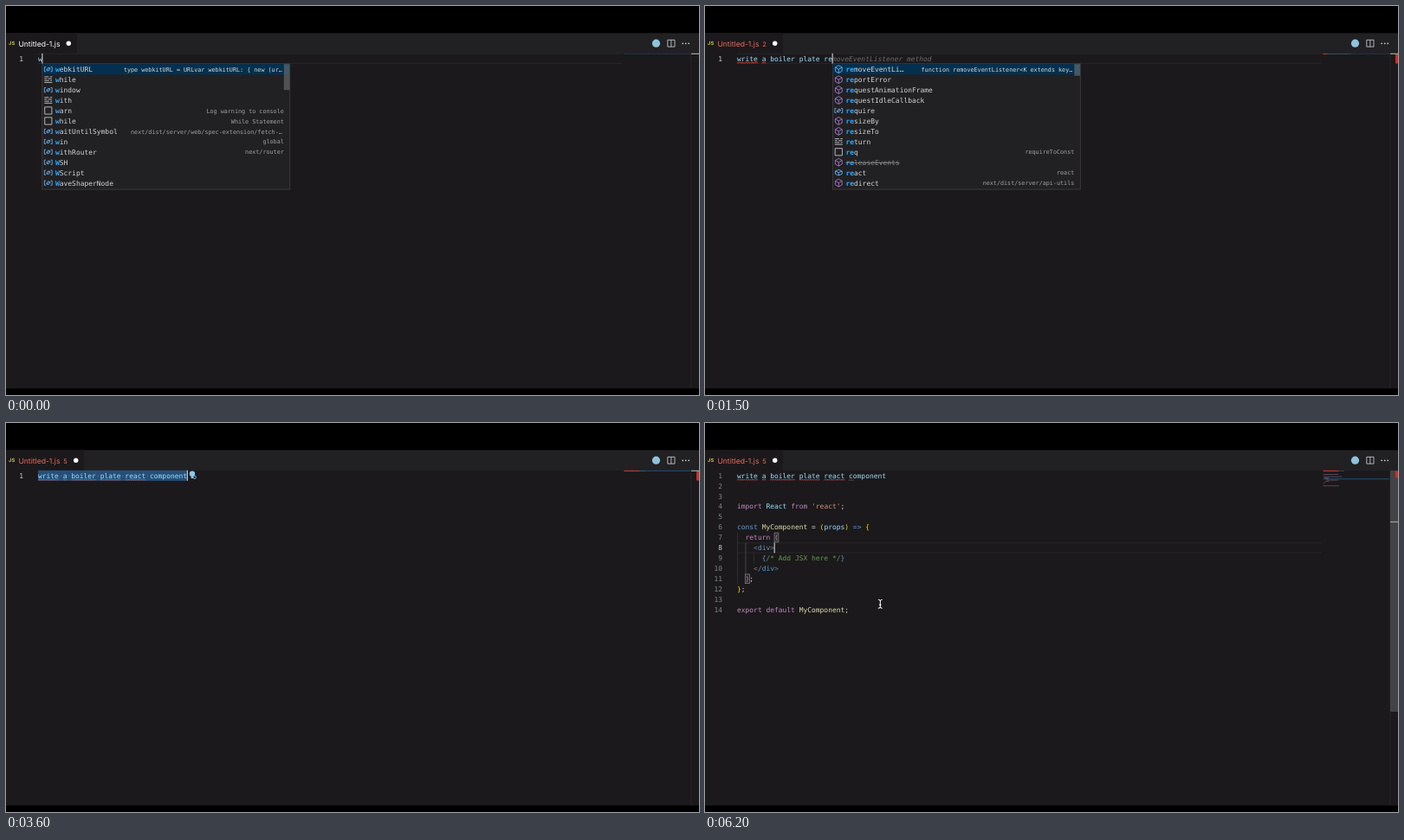
An HTML page that plays this animation: 800 px wide and 450 px high, repeating every 6.3 s.

```html
<!DOCTYPE html>
<html lang="en">
<head>
<meta charset="utf-8">
<title>Editor typing loop</title>
<style>
  html, body { margin: 0; width: 100%; height: 100%; overflow: hidden; background: #000; }
  svg { display: block; width: 800px; height: 450px; }
  text { font: 7.946px "DejaVu Sans Mono", monospace; white-space: pre; text-rendering: geometricPrecision; fill: #d4d4d4; }
  .ui { font: 8.6px Inter, sans-serif; fill: #fff; }
  .count { font-size: 7.6px; }
  .bad { fill: #e8695e; }
  .js { font: 700 5.8px Inter, sans-serif; fill: #cbcb41; }
  .num { fill: #858585; text-anchor: end; }
  .on { fill: #d0d0d0; }
  .detail { font-size: 6.76px; text-anchor: end; fill: #a2a2a2; }
  .picked .detail { fill: #d8d8d8; }
  .hit { fill: #2aaaff; font-weight: 700; }
  .old { text-decoration: line-through; fill: #8a8a8a; }
  .ghost { fill: #6c6b6d; font-style: italic; }
  .dots { fill: #5f8199; }
  .k { fill: #c586c0; } .v { fill: #9cdcfe; } .f { fill: #dcdcaa; }
  .b { fill: #569cd6; } .s { fill: #ce9178; } .c { fill: #6a9955; }
  .g { fill: #808080; } .y { fill: #ffd700; } .p { fill: #da70d6; } .w { fill: #d4d4d4; }
</style>
</head>
<body>
<svg viewBox="0 0 800 450">
  <rect width="800" height="450" fill="#000"/>
  <rect y="31.5" width="800" height="411" fill="#1b191b"/>
  <rect y="31.5" width="800" height="23.5" fill="#212023"/>
  <g id="scene"></g>
  <circle cx="750.5" cy="43.2" r="4.6" fill="#8fc3dc"/>
  <path d="M763.8 39.3h8.2v7.8h-8.2zM767.9 39.3v7.8" fill="none" stroke="#c5c5c5" stroke-width=".9"/>
  <g fill="#c5c5c5"><circle cx="781.2" cy="43.3" r=".9"/><circle cx="784.7" cy="43.3" r=".9"/><circle cx="788.2" cy="43.3" r=".9"/></g>
</svg>
<script>
const LOOP = 6300, TICK = 100;
const CH = 4.784, LH = 11.95, LEFT = 37, TOP = 54.8;
const PROMPT = 'write a boiler plate react component ';
const INSERT_AT = 4900, CLICK_AT = 5600, SELECT_AT = 3400;

const CODE = [
  ['v', PROMPT.trim()], [], [],
  ['k', 'import ', 'v', 'React', 'k', ' from ', 's', "'react'", 'w', ';'],
  [],
  ['b', 'const ', 'f', 'MyComponent', 'w', ' = ', 'y', '(', 'v', 'props', 'y', ')', 'b', ' => ', 'y', '{'],
  ['k', '  return ', 'p', '('],
  ['g', '    <', 'b', 'div', 'g', '>'],
  ['b', '      {', 'c', '/* Add JSX here */', 'b', '}'],
  ['g', '    </', 'b', 'div', 'g', '>'],
  ['p', '  )', 'w', ';'],
  ['y', '}', 'w', ';'],
  [],
  ['k', 'export default ', 'f', 'MyComponent', 'w', ';']
];

// icon|label|detail
const W_LIST = `var|webkitURL|type webkitURL = URLvar webkitURL: { new (ur…
key|while
var|window
key|with
snip|warn|Log warning to console
snip|while|While Statement
var|waitUntilSymbol|next/dist/server/web/spec-extension/fetch-…
var|win|global
var|withRouter|next/router
var|WSH
var|WScript
var|WaveShaperNode`.split('\n');
const RE_LIST = `fn|removeEventLi…|function removeEventListener<K extends key…
fn|reportError
fn|requestAnimationFrame
fn|requestIdleCallback
var|require
fn|resizeBy
fn|resizeTo
key|return
snip|req|requireToConst
fn|releaseEvents
mod|react|react
fn|redirect|next/dist/server/api-utils`.split('\n');

// Value of the last [time, value] pair reached
const step = (t, pairs) => pairs.filter(p => p[0] <= t).pop()[1];

function lerpKeys(t, keys) {
  for (let i = 1; i < keys.length; i++) {
    const [t0, a] = keys[i - 1], [t1, b] = keys[i];
    if (t <= t1) return a + (b - a) * (t - t0) / (t1 - t0);
  }
  return keys[keys.length - 1][1];
}

const esc = s => s.replace(/&/g, '&amp;').replace(/</g, '&lt;').replace(/>/g, '&gt;');
const rect = (x, y, w, h, fill, more = '') => `<rect x="${x}" y="${y}" width="${w}" height="${h}" fill="${fill}" ${more}/>`;
const path = (d, stroke, w = .8) => `<path d="${d}" fill="none" stroke="${stroke}" stroke-width="${w}"/>`;
const span = (cls, s) => `<tspan class="${cls}">${esc(s)}</tspan>`;
const text = (x, y, body, cls = '') => `<text x="${x}" y="${y}" class="${cls}" xml:space="preserve">${body}</text>`;
const lineTop = i => TOP + i * LH;
const baseline = i => lineTop(i) + 8.8;
const colX = c => LEFT + c * CH;
const plain = toks => toks.filter((_, i) => i % 2).join('');
const paint = toks => toks.map((s, i) => i % 2 ? span(toks[i - 1], s) : '').join('');

function tab(errors) {
  const w = errors ? (errors > 1 ? 90 : 89) : 82;
  return rect(0, 31.5, w, 23.5, '#1b191b')
    + text(3, 45.4, 'JS', 'js')
    + text(14.4, 46.6, 'Untitled-1.js', errors ? 'ui bad' : 'ui')
    + (errors ? text(66.2, 46.6, errors, 'ui count bad') : '')
    + `<circle cx="${errors ? w - 9.3 : 72.3}" cy="43.3" r="2.7" fill="#fff"/>`;
}

function squiggle(x, w) {
  let d = `M${x} 66.3`;
  for (let i = 0; i < Math.round(w / 1.2); i++) d += `l1.2 ${i % 2 ? 1.3 : -1.3}`;
  return path(d, '#e5483f', .8);
}

function underlines(count) {
  let col = 0, out = '';
  for (const word of PROMPT.split(' ').slice(0, count)) {
    out += squiggle(colX(col), word.length * CH);
    col += word.length + 1;
  }
  return out;
}

function icon(kind, x, y) {
  if (kind === 'var') return path(`M${x - 2.8} ${y - 2.6}h-1.6v5.2h1.6M${x + 2.8} ${y - 2.6}h1.6v5.2h-1.6M${x - 1.9} ${y}l2 -1.8l1.9 .9v1.2l-2 1.7l-1.9 -.9zM${x - 1.8} ${y + 1.8}l3.6 -3.6`, '#75beff', .8);
  if (kind === 'key') return path(`M${x - 4.5} ${y - 3.3}h5M${x + 2} ${y - 3.3}h2.5M${x - 4.5} ${y - 1.1}h3M${x - .3} ${y - 1.1}h4.5M${x - 4.5} ${y + 1.1}h5.5M${x + 2.3} ${y + 1.1}h2M${x - 4.5} ${y + 3.3}h9`, '#c5c5c5', .9);
  if (kind === 'snip') return path(`M${x - 4.1} ${y - 4.1}h8.2v8.2h-8.2z`, '#c5c5c5', .9);
  const flat = kind === 'mod' ? .75 : 1;
  const [a, b] = [2.2 * flat, 4.4 * flat];
  return path(`M${x} ${y - b}l3.9 ${a}v${b}l-3.9 ${a}l-3.9 ${-a}v${-b}zM${x - 3.9} ${y - a}l3.9 ${a}l3.9 ${-a}M${x} ${y}v${b}`,
    kind === 'fn' ? '#b180d7' : '#75beff', .8);
}

// Indices of the typed letters inside the label, or null
function match(label, word) {
  const hits = [];
  let from = 0;
  for (const c of word) {
    const at = label.toLowerCase().indexOf(c, from);
    if (at < 0) return null;
    hits.push(at);
    from = at + 1;
  }
  return hits;
}

function popup(list, word, x, thumb) {
  const rows = list.map(r => r.split('|')).filter(r => match(r[1], word));
  if (!rows.length) return '';
  const y = 67.2, h = rows.length * 11.95;
  let out = rect(x, y - .3, 286, h + 1.8, '#212023', 'stroke="#454446" stroke-width=".7"');
  rows.forEach(([kind, label, detail = ''], i) => {
    const top = y + i * 11.95, mid = top + 6;
    const hits = match(label, word);
    const name = [...label].map((c, j) => hits.includes(j) ? span('hit', c) : esc(c)).join('');
    const end = x + 279 - (detail.endsWith('…') ? 2 : 0);
    out += `<g class="${i ? '' : 'picked'}">`
      + (i ? '' : rect(x + .4, top, 285.2, 12, '#04304f'))
      + icon(!i && kind === 'fn' ? 'mod2' : kind, x + 7, mid)
      + text(x + 15.2, top + 8.9, name, label === 'releaseEvents' ? 'old' : '')
      + (detail ? text(end, top + 8.6, esc(detail), 'detail') : '') + '</g>';
  });
  if (rows.length === list.length) out += rect(x + 279, y, 6.7, thumb, '#79797a', 'opacity=".55"');
  return out;
}

function bulb(x, y) {
  return `<circle cx="${x}" cy="${y - 1.3}" r="3.2" fill="#8cc8f0"/>`
    + rect(x - 1.4, y + 1.4, 2.8, 2.6, '#8cc8f0')
    + `<circle cx="${x + 2.7}" cy="${y + 2.7}" r="1.7" fill="#1b191b" stroke="#8cc8f0" stroke-width=".9"/>`;
}

function selection(lines) {
  return lines.map((l, i) => {
    const tail = i < lines.length - 1 ? 1 : 0;
    return rect(LEFT, lineTop(i), (l.length + tail) * CH, LH + .1, '#264f78');
  }).join('');
}

const caret = (line, col) => rect(colX(col) - .4, lineTop(line), 1, LH, '#e4e4e4');
const lineFrame = line => path(`M${LEFT} ${lineTop(line) + .4}H711M${LEFT} ${lineTop(line) + LH - .4}H711`, '#2b292c', .8);

function minimap(lines, errors, activeLine, selected) {
  const x = 713.5, unit = .68, row = 1.33;
  const at = i => 55 + i * row;
  let out = selected && lines.length > 1
    ? rect(x, 54.8, 77, 18.6, '#1d3a57')
    : rect(x, at(activeLine) - .2, 77, 1.2, selected || activeLine ? '#1f4766' : '#1c3440');
  lines.forEach((l, i) => {
    const pad = l.length - l.trimStart().length;
    if (l) out += rect(x + pad * unit, at(i), (l.length - pad) * unit, .9, i ? '#8a6a86' : '#3f6a70', 'opacity=".6"');
  });
  const bad = PROMPT.split(' ').slice(0, errors).join(' ').length;
  return out + (bad ? rect(x, at(0) - .1, bad * unit, 1.2, '#b8352f') : '');
}

function ruler(errors, full, y) {
  return rect(790.5, 55, .8, 387, '#2a282b')
    + (full ? rect(791, 55, 9, 279, '#434244') : '')
    + (errors ? rect(797, 55.5, 3, full ? 8 : 11, '#c9302a') : '')
    + rect(791, y - .7, 9, 1.3, '#9a999b');
}

function ghostFor(n) {
  if (n >= 15 && n < 20) return 'plate'.slice(n - 15);
  return { 23: 'moveEventListener method', 27: 'component', 37: 'with' }[n] || '';
}

function pointer(t) {
  const p = (t - CLICK_AT) / 600, e = 1 - (1 - p) ** 2;
  const x = 90 + 112.3 * e, y = 145 + 64.3 * e;
  const d = `M${x - 2.5} ${y - 5}q2 0 2.5 1.5q.5 -1.5 2.5 -1.5M${x} ${y - 3.6}v7.2M${x - 2.5} ${y + 5}q2 0 2.5 -1.5q.5 1.5 2.5 1.5M${x - 1.4} ${y + 1}h2.8`;
  return path(d, '#000', 2.4) + path(d, '#fff', 1.1);
}

function typing(t, errors) {
  const keys = [[0, 1], [1100, 15], [1500, 23], [2100, 27], [2600, 37]];
  const n = t >= 2900 ? 36 : Math.floor(lerpKeys(t, keys) + 1e-6);
  const typed = PROMPT.slice(0, n), ghost = ghostFor(n);
  const selected = t >= SELECT_AT;
  let out = selected ? selection([typed]) : lineFrame(0);
  if (selected) out += text(LEFT, baseline(0), typed.replace(/[^ ]/g, '\u00a0').replace(/ /g, '·'), 'dots');
  out += text(20, baseline(0), '1', 'num on')
    + text(LEFT, baseline(0), span('v', typed) + span('ghost', ghost))
    + underlines(errors)
    + (t >= 2600 && t < 2900 ? '' : caret(0, n))
    + minimap([typed + ghost], errors, 0, selected)
    + ruler(errors, false, 55.4);
  if (selected) out += bulb(215, 60);
  if (n < 6) out += popup(W_LIST, typed, 41.8, 30);
  if (n >= 23 && n < 27) out += popup(RE_LIST, typed.slice(21), 147.3, 13.5);
  return out;
}

function inserted(t) {
  const lines = CODE.map(plain);
  const selected = t < CLICK_AT, active = selected ? 13 : 7;
  let out = selected ? selection(lines) : lineFrame(active);
  if (!selected) {
    const guide = (col, a, b, c) => path(`M${colX(col) + .4} ${lineTop(a)}V${lineTop(b)}`, c, .7);
    out += guide(0, 6, 11, '#3a393b') + guide(2, 7, 10, '#5c5b5d') + guide(4, 8, 9, '#3a393b');
    for (const [line, col] of [[6, 9], [10, 2]])
      out += rect(colX(col), lineTop(line) + .6, CH, LH - 1.2, '#243024', 'stroke="#888" stroke-width=".7"');
  }
  CODE.forEach((toks, i) => {
    out += text(20, baseline(i), i + 1, i === active ? 'num on' : 'num');
    if (selected) out += text(LEFT, baseline(i), lines[i].replace(/[^ ]/g, '\u00a0').replace(/ /g, '·'), 'dots');
    out += text(LEFT, baseline(i), paint(toks));
  });
  out += underlines(5)
    + [0, 1, 2].map(i => rect(colX(27) + i * 2.2, 65.6, .9, .9, '#a5a5a5')).join('')
    + (selected ? caret(13, 27) + bulb(215, 60) : caret(7, 9))
    + minimap(lines, 5, active, selected)
    + ruler(5, true, selected ? 165.5 : 114.5);
  return selected ? out : out + pointer(t);
}

const scene = document.getElementById('scene');
const start = performance.now();
let shown = -1;

function frame() {
  const t = Math.floor((performance.now() - start) % LOOP / TICK) * TICK;
  if (t !== shown) {
    shown = t;
    const errors = step(t, [[0, 0], [700, 1], [1300, 2], [1900, 3], [2200, 4], [2400, 5]]);
    scene.innerHTML = tab(errors) + (t < INSERT_AT ? typing(t, errors) : inserted(t));
  }
  requestAnimationFrame(frame);
}
frame();
</script>
</body>
</html>
```
